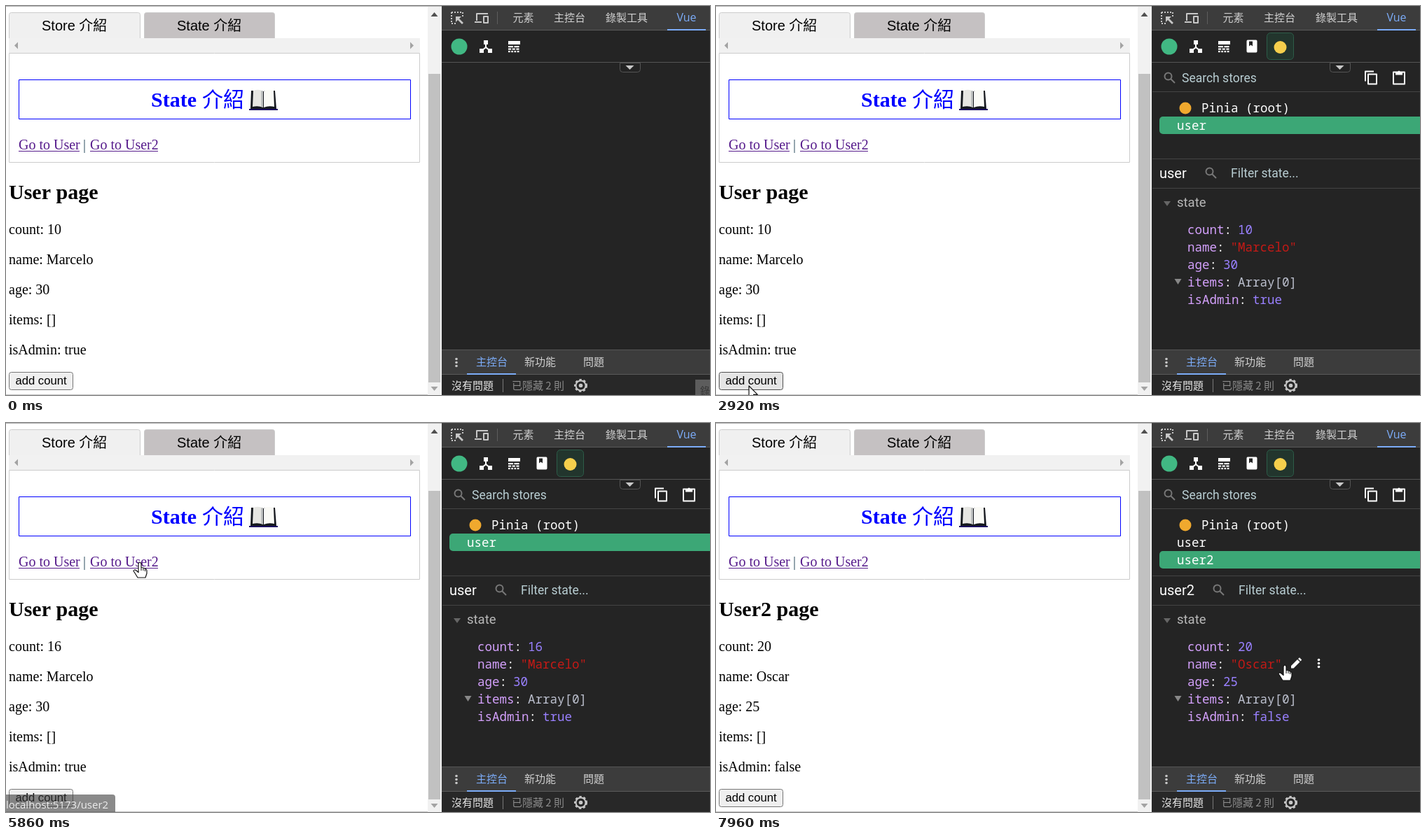
Write an HTML page with a canvas that moves like this. It is 1005 px wide and 556 px high and loops after 8000 ms.

```html
<!DOCTYPE html>
<html lang="zh-Hant">
<head>
<meta charset="utf-8">
<title>State</title>
<style>
html, body { margin: 0; width: 100%; height: 100%; overflow: hidden; background: #fff; }
canvas { display: block; }
</style>
</head>
<body>
<canvas id="stage" width="1005" height="556"></canvas>
<script>
const c = document.getElementById('stage').getContext('2d');
const LOOP = 8000, TICK = 68.1;
const CJK = '"Noto Sans CJK TC", "Noto Sans CJK JP", sans-serif';
const SERIF = '"Liberation Serif", ' + CJK;
const ARIAL = '"Liberation Sans", ' + CJK;
const UI = '"Open Sans", ' + CJK;
const ROBOTO = 'Roboto, sans-serif';
const MONO = '500 17.5px "Noto Sans Mono", monospace';
const BLUE = '#7cacf8';

const USERS = {
  user: { name: 'Marcelo', age: 30, isAdmin: true },
  user2: { name: 'Oscar', age: 25, isAdmin: false }
};

// Pointer keys: tick, x, y
const PATH = [
  [5, 866, 500], [8, 838, 345], [12, 573, 300], [14, 580, 180], [16, 606, 137],
  [17, 606, 137], [18, 660, 168], [20, 700, 172], [22, 775, 285], [23, 821, 317],
  [26, 800, 395], [29, 724, 474], [30, 700, 474], [40, 62, 538], [41, 48, 542],
  [43, 47, 543], [65, 47, 543], [72, 650, 329], [73, 665, 324], [75, 690, 317],
  [77, 690, 317], [83, 200, 198], [84, 191, 199], [95, 191, 199], [98, 730, 173],
  [99, 741, 176], [100, 741, 176], [102, 741, 179], [106, 738, 194], [107, 738, 194],
  [115, 813, 341], [117, 812, 346]
];

function pointer(k) {
  if (k < PATH[0][0]) return { x: -99, y: -99 };
  const i = PATH.findIndex(p => p[0] >= k);
  const b = PATH[i < 0 ? PATH.length - 1 : i], a = PATH[Math.max(0, i - 1)];
  const u = b[0] === a[0] ? 1 : Math.min(1, (k - a[0]) / (b[0] - a[0]));
  return { x: a[1] + (b[1] - a[1]) * u, y: a[2] + (b[2] - a[2]) * u };
}

const inside = (p, x0, y0, x1, y1) => p.x >= x0 && p.x < x1 && p.y >= y0 && p.y < y1;

function rect(x, y, w, h, color) {
  c.fillStyle = color;
  c.fillRect(x, y, w, h);
}

// Outlined boxes are inset by half a pixel to keep the line crisp
function box(x, y, w, h, r, fill, line) {
  const d = line ? .5 : 0;
  c.beginPath();
  c.roundRect(x + d, y + d, w - 2 * d, h - 2 * d, r);
  if (fill) { c.fillStyle = fill; c.fill(); }
  if (line) { c.strokeStyle = line; c.lineWidth = 1; c.stroke(); }
}

function disc(x, y, r, color) {
  c.fillStyle = color;
  c.beginPath();
  c.arc(x, y, r, 0, Math.PI * 2);
  c.fill();
}

function text(s, x, y, font, color, align = 'left') {
  c.font = font;
  c.fillStyle = color;
  c.textAlign = align;
  c.fillText(s, x, y);
}

// Draws an SVG path at an offset, filled and/or stroked
function shape(d, x, y, fill, line, width = 1) {
  const p = new Path2D(d);
  c.save();
  c.translate(x, y);
  if (fill) { c.fillStyle = fill; c.fill(p); }
  if (line) { c.strokeStyle = line; c.lineWidth = width; c.stroke(p); }
  c.restore();
}

function search(x, y) {
  shape('M3.5-1.5A5 5 0 1 1-6.5-1.5A5 5 0 1 1 3.5-1.5M2 2L8 8', x, y, null, '#777', 2);
}

function dots(x, y, color) {
  for (const d of [-5, 0, 5]) disc(x, y + d, 1.8, color);
}

function book() {
  shape('M3 3H17L20.5 4L24 3H37L39 29H2Z', 347, 118, '#14171d');
  shape('M6 3Q14 0 20 4V27Q13 24 5 26Z', 347, 118, '#e6e6e2');
  shape('M35 3Q27 0 21 4V27Q28 24 36 26Z', 347, 118, '#fafaf6');
  shape('M17 3L20 4V27L17 25.5Z', 347, 118, '#bfc1c1');
  rect(347, 147, 41, 2, '#1c0f60');
}

function drawPage(k, user, hover) {
  rect(0, 0, 622, 556, '#fff');

  box(4, 9, 188, 38, [3, 3, 0, 0], '#f0f0f0', '#ccc');
  box(197, 9, 187, 38, [3, 3, 0, 0], '#c5c1c2', '#ccc');
  text('Store 介紹', 51, 35, '300 20px ' + ARIAL, '#000');
  text('State 介紹', 244, 35, '300 20px ' + ARIAL, '#000');
  rect(4, 46, 587, 21, '#f1f1f1');
  shape('M3-5L-2 0L3 5Z', 14, 56.5, '#a3a3a3');
  shape('M-3-5L2 0L-3 5Z', 580, 56.5, '#a3a3a3');
  box(4, 67, 587, 157, 0, null, '#ccc');

  box(18, 105, 560, 57, 0, null, '#00f');
  text('State', 207, 144, 'bold 30px ' + SERIF, '#00f');
  text('介紹', 280, 144, '500 30px ' + CJK, '#00f');
  book();

  for (const [s, x, w] of [['Go to User', 18, 87], ['Go to User2', 120, 97]]) {
    text(s, x, 205, '20px ' + SERIF, '#551a8b');
    rect(x, 207, w, 1, '#551a8b');
  }
  text('|', 110, 205, '20px ' + SERIF, '#2c4f60');

  const u = USERS[user.id];
  text(user.id === 'user' ? 'User page' : 'User2 page', 4, 276, 'bold 30px ' + SERIF, '#000');
  ['count: ' + user.count, 'name: ' + u.name, 'age: ' + u.age, 'items: []', 'isAdmin: ' + u.isAdmin]
    .forEach((s, i) => text(s, 4, 326 + 43 * i, '20px ' + SERIF, '#000'));

  const over = inside(hover, 4, 523, 96, 556);
  const down = k >= 54 && k < 66 && k % 2 === 0;
  box(4, 523, 92, 26, 3, down ? '#f5f5f5' : over ? '#e5e5e5' : '#efefef', down ? '#8d8d8d' : over ? '#4f4f4f' : '#767676');
  text('add count', 50, 541, '16.67px ' + ARIAL, '#000', 'center');

  rect(602, 0, 20, 556, '#f1f1f1');
  rect(603, 97, 17, 441, '#c1c1c1');
  shape('M-5 3L0-3L5 3Z', 611.5, 12, '#505050');
  shape('M-5-3L0 3L5-3Z', 611.5, 547, '#a3a3a3');
  rect(0, 0, 622, 1, '#b4b4b4');
  rect(0, 555, 602, 1, '#c8c8c8');
}

function drawFrame(k) {
  rect(622, 0, 383, 556, '#242424');
  rect(622, 0, 383, 35, '#3c3c3c');
  rect(622, 34, 383, 1, '#5a5a5a');

  const icon = '#c7c7c7';
  c.setLineDash([2, 2]);
  shape('M-8-8H8M-8-8V8M8-8V-2M-8 8H-2', 644, 17, null, icon, 2);
  c.setLineDash([]);
  shape('M-2-2H6L3 1L9 7L7 9L1 3L-2 6Z', 644, 17, icon);
  shape('M-7 4V-6H9M-10 6H0M3-2H9V7H3Z', 679, 17, null, icon, 2);
  rect(701, 8, 1, 18, '#5e5e5e');
  for (const [s, x] of [['元素', 738.5], ['主控台', 804.5], ['錄製工具', 886]])
    text(s, x, 22, '15px ' + CJK, '#d0d0d0', 'center');
  text('Vue', 971.5, 22, '16px ' + UI, BLUE, 'center');
  rect(944, 33, 55, 2, BLUE);

  disc(647, 58, 11.5, '#41b883');
  shape('M0-5V1L-6 6M0 1L6 6', 685, 58, null, '#fff', 2);
  shape('M-3-9H3V-3H-3ZM-9 3H-3V9H-9ZM3 3H9V9H3Z', 685, 58, '#fff');
  rect(717, 50, 17, 5, '#fff');
  for (let i = 0; i < 3; i++) {
    const n = i + 2;
    for (let j = 0; j < n; j++) rect(717 + j * 17 / n, 57 + i * 3.5, 17 / n - 1.5, 2.2, '#fff');
  }
  rect(622, 80, 383, 1, '#555');

  rect(622, 491, 383, 36, '#3c3c3c');
  rect(622, 491, 383, 1, '#555');
  rect(622, 526, 383, 1, '#5a5a5a');
  dots(643, 509.5, icon);
  text('主控台', 693.5, 514, '15px ' + CJK, BLUE, 'center');
  rect(658, 525, 70, 2, BLUE);
  text('新功能', 762.5, 514, '15px ' + CJK, '#d0d0d0', 'center');
  text('問題', 839, 514, '15px ' + CJK, '#d0d0d0', 'center');
  rect(622, 527, 383, 29, '#282828');
  text('沒有問題', 636, 548, '15px ' + CJK, '#e3e3e3');
  rect(709, 533, 1, 19, '#777');
  text('已隱藏 2 則', 722, 548, '15px ' + CJK, '#8c8c8c');
  c.setLineDash([3.2, 2.7]);
  shape('M8 0A8 8 0 1 1-8 0A8 8 0 1 1 8 0', 820.5, 542.5, null, icon, 3);
  c.setLineDash([]);
  shape('M7 0A7 7 0 1 1-7 0A7 7 0 1 1 7 0', 820.5, 542.5, null, icon, 2);
  disc(820.5, 542.5, 2.8, icon);

  if (k < 1) {
    rect(984, 534, 21, 22, '#5d5d5d');
    text('錄', 991, 555, '14px ' + CJK, '#343434');
  }
}

function drawHandle() {
  box(876, 81, 30, 14, [0, 0, 4, 4], '#242424', '#555');
  shape('M-6-3H6L0 3Z', 890.5, 88, '#c8c8c8');
}

function drawTools() {
  shape('M-6-9H6Q7.5-9 7.5-7V7Q7.5 9 6 9H-6Q-7.5 9-7.5 7V-7Q-7.5-9-6-9ZM-4-7V0L-1.5-2L1 0V-7Z', 765, 57.5, '#fff');
  box(786, 38, 39, 39, 5, '#22352d', '#2d5c48');
  disc(805.5, 59, 9, '#f5cf4c');

  search(647, 102);
  text('Search stores', 665, 109, '17.5px ' + ROBOTO, '#b8cdd2');
  shape('M-4-5H8V9H-4ZM-8 5V-9H4', 935, 102.5, null, '#fff', 2);
  shape('M-8-8H8V9H-8Z', 975, 102.5, null, '#fff', 2);
  shape('M-5-8H-2Q0-12 2-8H5V-4H-5Z', 975, 102.5, '#fff');
  rect(623, 122, 382, 1, '#444');
}

function rowIcons(x, y, kind) {
  shape('M-7 7V3.5L2-5.5L5.5-2L-3.5 7ZM3-6.5L5-8.3L8.2-5L6.5-3Z', x, y, '#fff');
  if (kind === 'number') {
    rect(x + 26, y - 1, 13, 2, '#fff');
    rect(x + 59, y - 1, 12, 2, '#fff');
    rect(x + 64, y - 6, 2, 12, '#fff');
    dots(x + 97, y, '#fff');
  } else dots(x + 32.5, y, '#fff');
}

function drawStores(k, selected, count, hover) {
  const overRow = y => inside(hover, 633, y, 1005, y + 25);
  disc(670, 146, 8.5, '#f0a92e');
  text('Pinia (root)', 693, 152, MONO, '#fff');
  ['user', 'user2'].slice(0, k >= 92 ? 2 : 1).forEach((s, i) => {
    const y = 158 + 25 * i, over = overRow(y);
    const fill = s === selected ? (over ? '#0aad57' : '#3ca776') : over ? '#173a2c' : null;
    if (fill) box(633, y, 380, 25, 5, fill);
    text(s, 658, y + 19, MONO, '#fff');
  });

  rect(623, 218, 382, 1, '#444');
  const shift = selected === 'user2' ? 11 : 0;
  text(selected, 633, 246, '20px ' + ROBOTO, '#fff');
  search(706 + shift, 238);
  text('Filter state...', 735 + shift, 245, '17.5px ' + ROBOTO, '#b8cdd2');
  rect(623, 260, 382, 1, '#444');

  if (inside(hover, 629, 265, 1005, 299)) box(629, 265, 390, 34, 5, '#171717');
  shape('M-5-3H5L0 4Z', 644, 282, '#666');
  text('state', 658, 287, '18.5px ' + ROBOTO, '#b8b8b8');

  const u = USERS[selected];
  const fields = [
    ['count', count, '#9980ff'], ['name', `"${u.name}"`, '#c41a16'], ['age', u.age, '#9980ff'],
    ['items', 'Array[0]', '#bdc1cf'], ['isAdmin', u.isAdmin, '#9980ff']
  ];
  fields.forEach(([key, value, color], i) => {
    const y = 326 + 25 * i, end = 673 + key.length * 10.5, x = end + 19.5;
    text(key, 673, y, MONO, '#d3a0fb');
    text(':', end, y, MONO, '#fff');
    text(value, x, y, MONO, color);
    if (key === 'items') shape('M-5-4H5L0 4Z', 659.5, y - 7, '#888');
    if (inside(hover, 629, y - 18, 1005, y + 7))
      rowIcons(x + String(value).length * 10.5 + 20, y - 7.5, typeof value);
  });
}

function drawStatus(k) {
  const alpha = k < 86 || k > 104 ? 0 : Math.min(1, .6 + (k - 86) * .2, .6 + (102 - k) * .2);
  if (alpha <= 0) return;
  c.globalAlpha = alpha;
  box(-4, 531, 160, 30, 4, '#3c3c3c');
  c.globalAlpha = 1;
  text('localhost:5173/user2', 0, 551, '15px ' + UI, '#eee');
}

function drawPointer(p) {
  const hand = inside(p, 629, 133, 1005, 430) || inside(p, 120, 188, 217, 211);
  const d = hand
    ? 'M-2 2Q0-2 2 2V7.5L5 8L8 9.2Q10 10 10 12V16L8 22H-3L-7 15.5L-9 12.5Q-8 10-5.5 11.5L-2 14.5Z'
    : 'M0 0V17L4 13.3L6.7 19L9.3 18L6.6 12.4H12.3Z';
  shape(d, p.x, p.y, '#fff', '#111', 1.2);
  if (hand) shape('M2 8V12M5 9V12M7.6 10V13', p.x, p.y, null, '#111', 1);
}

function draw(t) {
  const k = Math.floor((t + 12) / TICK);
  const hover = pointer(k - 1);
  const clicks = Math.max(0, Math.min(6, Math.floor((k - 53) / 2)));
  const first = 10 + clicks;
  const page = k >= 91 ? { id: 'user2', count: 20 } : { id: 'user', count: first };
  const selected = k >= 108 ? 'user2' : 'user';

  c.lineJoin = 'round';
  drawPage(k, page, hover);
  drawFrame(k);
  if (k >= 1) drawTools();
  drawHandle();
  if (k >= 2) drawStores(k, selected, selected === 'user' ? first : 20, hover);
  drawStatus(k);
  drawPointer(pointer(k));
}

const start = performance.now();
function loop() {
  draw((performance.now() - start) % LOOP);
  requestAnimationFrame(loop);
}
loop();
</script>
</body>
</html>
```
